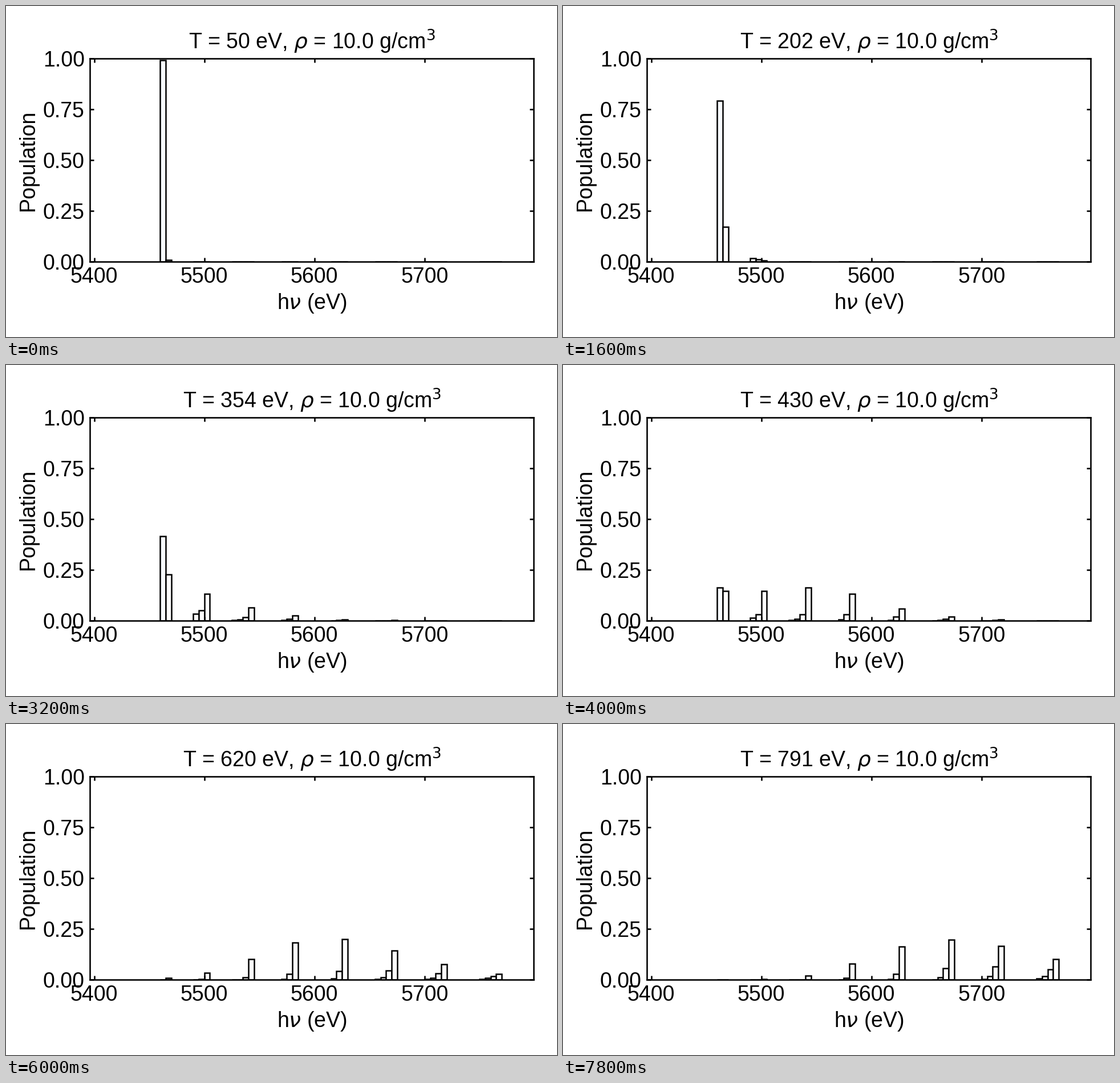
These frames come from a looping animation (966 px wide and 580 px high, 8 s). A matplotlib script:

```python
import numpy as np
import matplotlib.pyplot as plt
from matplotlib.animation import FuncAnimation

W, H, DPI = 966, 580, 150
FRAMES, STEP = 40, 200
LEFT, RIGHT, TOP, BOTTOM = 147.2, 925.3, 92, 448
X5400, PX_PER_EV = 154.5, 1.9314
BIN = 5

plt.rcParams.update({
    "font.family": "Liberation Sans",
    "font.size": 18,
    "mathtext.fontset": "dejavusans",
    "axes.linewidth": 1.25,
})

# Leading line of each charge state: per-mille population at KNOTS (eV)
KNOTS = np.array([50, 202, 354, 506, 620, 696, 791])
MAIN = {
    5460: [992, 792, 414, 34, 1.3, 0.2, 0.03],
    5465: [8, 171, 227, 53, 7, 1.5, 0.3],
    5500: [1e-3, 6, 132, 118, 33, 11, 3],
    5540: [1e-6, 0.05, 65, 180, 100, 52, 20],
    5580: [1e-7, 2e-3, 26, 186, 180, 132, 79],
    5625: [1e-8, 1e-4, 7, 131, 197, 196, 163],
    5670: [1e-9, 1e-5, 1.5, 65, 140, 177, 195],
    5715: [1e-9, 1e-6, 0.2, 23, 74, 116, 166],
    5765: [1e-9, 1e-7, 0.03, 5, 28, 55, 102],
}

# Satellites: strength relative to the leading line at three temperatures
SIDE_T = (354, 506, 791)
SIDE = {
    5540: [[0.246, 0.15, 0.05], [0.08, 0.025, 0.005], [0.06, 0.011, 0.001]],
    5580: [[0.27, 0.2, 0.089], [0.08, 0.027, 0.005]],
    5625: [[0.43, 0.28, 0.166], [0.1, 0.046, 0.018]],
    5670: [[0.5, 0.37, 0.282], [0.2, 0.11, 0.051], [0.05, 0.02, 0.005]],
    5715: [[0.6, 0.48, 0.386], [0.3, 0.17, 0.102], [0.1, 0.05, 0.018]],
    5765: [[0.9, 0.66, 0.5], [0.5, 0.33, 0.176], [0.2, 0.11, 0.049]],
}
COOL_T = (202, 354, 506)
COOL_SIDE = [[1.8, 0.386, 0.144], [2.8, 0.25, 0.034]]


def monotone(x, y, xq):
    """Monotone cubic interpolation."""
    h, d = np.diff(x), np.diff(y) / np.diff(x)
    m = np.concatenate([d[:1], np.zeros(len(x) - 2), d[-1:]])
    for i in range(1, len(x) - 1):
        if d[i - 1] * d[i] > 0:
            a, b = 2 * h[i] + h[i - 1], h[i] + 2 * h[i - 1]
            m[i] = (a + b) / (a / d[i - 1] + b / d[i])
    i = np.clip(np.searchsorted(x, xq, side="right") - 1, 0, len(h) - 1)
    t = (xq - x[i]) / h[i]
    return ((1 + 2 * t) * (1 - t) ** 2 * y[i] + t * (1 - t) ** 2 * h[i] * m[i]
            + t * t * (3 - 2 * t) * y[i + 1] + t * t * (t - 1) * h[i] * m[i + 1])


def ratio(temps, values, T):
    fit = np.polyfit(temps, np.log(values), 2)
    return np.exp(np.polyval(fit, np.clip(T, 202, 791)))


temps = 50 + 19 * np.arange(FRAMES)
pops = {}
for energy, values in MAIN.items():
    logs = np.log(values)[::-1]
    main = np.exp(monotone(1 / KNOTS[::-1], logs, 1 / temps))
    pops[energy] = main
    sides, keys = (COOL_SIDE, COOL_T) if energy == 5500 else (SIDE.get(energy, []), SIDE_T)
    for n, strengths in enumerate(sides, 1):
        pops[energy - BIN * n] = main * ratio(keys, strengths, temps)

energies = sorted(pops)
heights = np.array([pops[e] for e in energies])
heights *= (1 - 1e-5 * (temps - 50)) / heights.sum(axis=0)

fig = plt.figure(figsize=(W / DPI, H / DPI), dpi=DPI, facecolor="white")
ax = fig.add_axes([LEFT / W, 1 - BOTTOM / H, (RIGHT - LEFT) / W, (BOTTOM - TOP) / H])
ax.set_xlim(*(5400 + (x - X5400) / PX_PER_EV for x in (LEFT, RIGHT)))
ax.set_ylim(0, 1)
ax.set_xticks([5400, 5500, 5600, 5700])
ax.set_yticks(np.linspace(0, 1, 5))
ax.tick_params(direction="in", top=True, right=True, length=3.5, width=1.25, pad=4.5)

fills = ["#f7fbff" if e == 5460 else "white" for e in energies]
bars = ax.bar(energies, heights[:, 0], width=BIN, align="edge",
              color=fills, edgecolor="black", linewidth=1.2)


def label(x, y, text, **kw):
    return fig.text(x / W, 1 - y / H, text, ha="center", va="baseline", **kw)


title = label(536.5, 76, "")
label(536.5, 531, r"h$\nu$ (eV)")
fig.text(49.3 / W, 1 - (TOP + BOTTOM) / 2 / H, "Population", rotation=90,
         rotation_mode="anchor", ha="center", va="baseline")


def draw(i):
    for bar, height in zip(bars, heights[:, i]):
        bar.set_height(height)
    title.set_text(rf"T = {temps[i]} eV, $\rho$ = 10.0 g/cm$^3$")
    return [*bars, title]


anim = FuncAnimation(fig, draw, frames=FRAMES, interval=STEP, repeat=True, repeat_delay=0)
plt.show()
```
